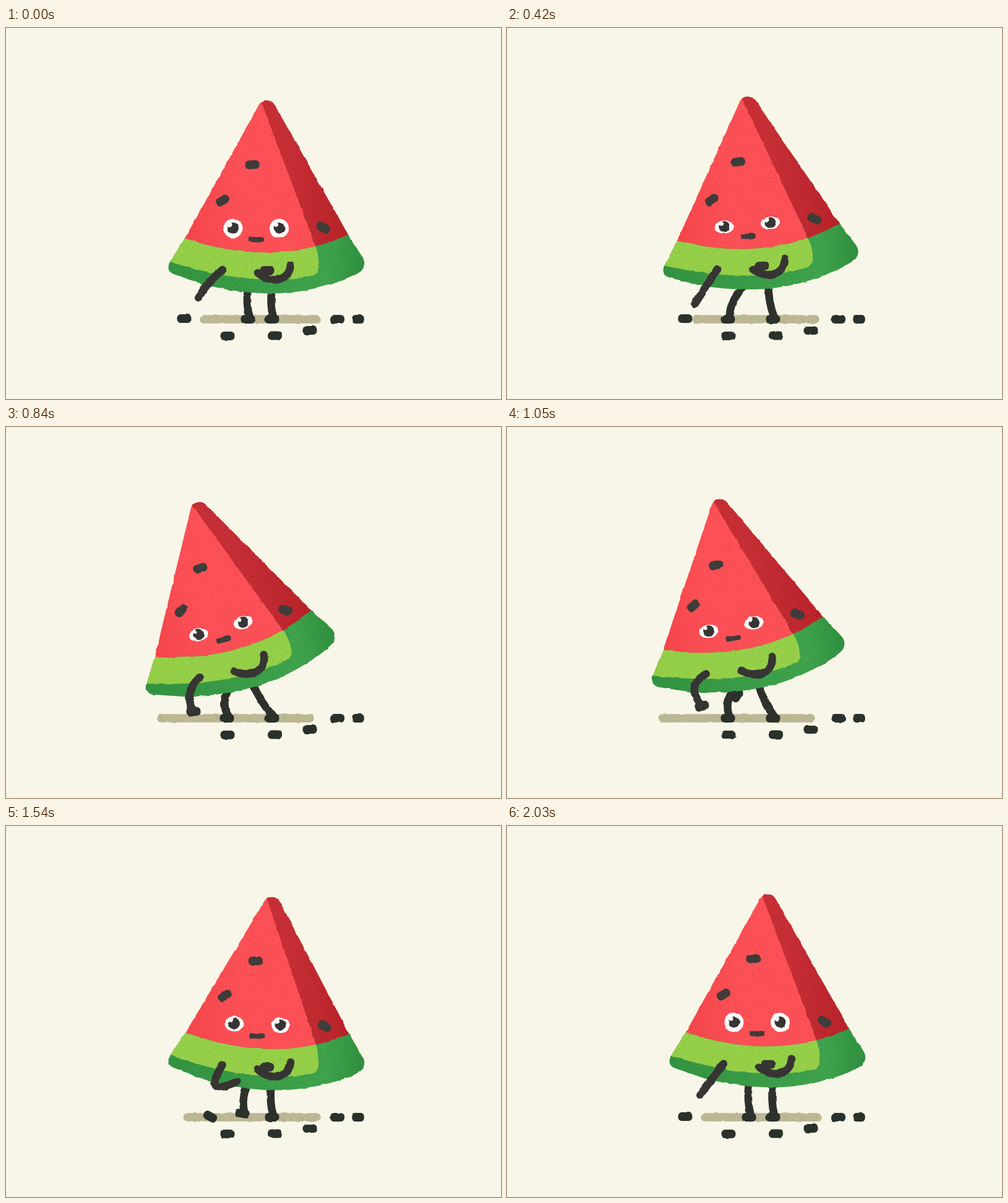
Recreate the animation shown at these times as an HTML page. Size 800 px wide and 600 px high, loop 2100 ms.

```html
<!DOCTYPE html>
<html lang="en">
<head>
<meta charset="utf-8">
<title>Melon slice</title>
<style>
  html, body { margin: 0; width: 100%; height: 100%; overflow: hidden; background: #f8f6e8; }
  svg { display: block; width: 800px; height: 600px; }
  .limb { fill: none; stroke: #383634; stroke-width: 12.5; stroke-linecap: round; }
  .leg { stroke: #2f312d; }
</style>
</head>
<body>
<svg viewBox="0 0 800 600">
  <defs>
    <filter id="rough" filterUnits="userSpaceOnUse" x="200" y="80" width="410" height="440" color-interpolation-filters="sRGB">
      <feTurbulence id="wobble" type="fractalNoise" baseFrequency=".09" result="n"/>
      <feDisplacementMap in="SourceGraphic" in2="n" scale="3.5" xChannelSelector="R" yChannelSelector="G" result="shape"/>
      <feTurbulence type="fractalNoise" baseFrequency=".6" numOctaves="2"/>
      <feColorMatrix values="0 0 0 0 0  0 0 0 0 0  0 0 0 0 0  .5 0 0 0 -.26"/>
      <feComposite in2="shape" operator="atop"/>
    </filter>
    <linearGradient id="flesh"><stop offset="0" stop-color="#f8464c"/><stop offset=".4" stop-color="#ff5157"/></linearGradient>
    <linearGradient id="side"><stop offset=".3" stop-color="#c92f36"/><stop offset="1" stop-color="#ba232a"/></linearGradient>
    <linearGradient id="rind"><stop offset="0" stop-color="#339542"/><stop offset=".8" stop-color="#40a54d"/><stop offset="1" stop-color="#2f9140"/></linearGradient>
    <rect id="seed" x="-11.5" y="-7" width="23" height="14" rx="6"/>
  </defs>
  <g filter="url(#rough)">
    <path id="shadow" stroke="#bfba96" stroke-width="13.5" stroke-linecap="round"/>
    <g fill="#2b322b">
      <use href="#seed" x="358" y="498"/>
      <use href="#seed" x="434.5" y="497.5"/>
      <use href="#seed" x="491" y="489"/>
      <use href="#seed" x="535.5" y="471"/>
      <use href="#seed" transform="translate(569 471) scale(.85 1)"/>
      <use href="#seed" id="foot"/>
      <use href="#seed" x="430" y="471"/>
    </g>
    <path id="legL" class="limb leg"/>
    <path id="legR" class="limb leg"/>
    <use href="#seed" id="loose" fill="#2b322b"/>
    <g id="body">
      <path fill="url(#rind)" d="M-132-43L132-49L156-11Q162 1 152 11Q130 26 79 38Q0 57-101 32L-150 15Q-162 10-157-3Z"/>
      <path fill="url(#side)" d="M-9-261Q-8-266 0-266Q9-266 13-259L132-49Q106-37 79-30Z"/>
      <path fill="#97d249" d="M-132-43Q-20-5 79-30Q86-14 84 5Q83 14 76 17Q-20 38-156-5Z"/>
      <path fill="url(#flesh)" d="M-132-43Q-20-5 79-30L-8-263Q-11-262-12-259Z"/>
      <g fill="#403d3b">
        <use href="#seed" transform="translate(-23 -162) rotate(-3)"/>
        <use href="#seed" transform="translate(-71 -104) rotate(-32)"/>
        <use href="#seed" transform="translate(92 -60) rotate(30)"/>
        <rect x="-29" y="-45" width="24" height="8.5" rx="3"/>
      </g>
      <g id="eyes"></g>
      <use href="#seed" id="held" x="1" y="9" fill="#383634"/>
      <path class="limb" d="M39 0C37 26 8 32-14 13"/>
    </g>
    <use href="#seed" id="carried" fill="#333431"/>
    <path id="arm" class="limb"/>
  </g>
</svg>
<script>
const LOOP = 2100, STEP = 70;
const PICK = 630, DROP = 840, PASS = 1400, REST = 2030;
const $ = id => document.getElementById(id);

const part = (t, a, b) => Math.min(1, Math.max(0, (t - a) / (b - a)));
const ease = (t, a, b) => { const u = part(t, a, b); return u * u * (3 - 2 * u); };
const pulse = (t, a, b, c, d) => ease(t, a, b) - ease(t, c, d);
const bump = (t, a, b) => Math.sin(Math.PI * part(t, a, b)) ** 2;
const arc = (t, a, b) => { const u = part(t, a, b); return 4 * u * (1 - u); };

// The left hand: rest, reach, lift, pass the seed on, hang, rest.
const hands = [[280, 311, 436], [PICK, 289, 467], [1050, 313, 448],
  [PASS, 385, 404], [1820, 341, 438], [REST, 312, 435]];
const handAt = t => hands.slice(1).reduce(([x, y], [end, nx, ny], i) => {
  const u = ease(t, hands[i][0], end);
  return [x + (nx - x) * u, y + (ny - y) * u];
}, hands[0].slice(1));

const place = (id, x, y, turn = 0) =>
  $(id).setAttribute('transform', `translate(${x} ${y}) rotate(${turn})`);
const curve = (id, from, bend, to) => $(id).setAttribute('d', `M${from}Q${bend} ${to}`);
const show = (id, on) => $(id).setAttribute('visibility', on ? 'visible' : 'hidden');

function leg(id, [hx, hy], x, y, bend) {
  curve(id, [hx, hy], [(hx + x) / 2 - bend, (hy + y) / 2 + 3], [x, y]);
}

// The shorter the reach, the further the elbow sticks out.
function arm([sx, sy], [hx, hy]) {
  const dx = hx - sx, dy = hy - sy, reach = Math.hypot(dx, dy);
  const bend = Math.max(0, 62 - reach) * 2.3 / reach;
  curve('arm', [sx, sy], [(sx + hx) / 2 - dy * bend, (sy + hy) / 2 + dx * bend], [hx, hy]);
}

// The dropped seed falls, bounces twice and rolls out.
function looseSeed(t) {
  if (t < PICK) return [288, 470];
  const u = part(t, DROP, REST), fall = part(t, DROP, 1120);
  const y = 470 - 82 * (1 - fall * fall) * (t < 1120) - 23 * arc(t, 1120, 1540) - 12 * arc(t, 1540, 1890);
  return [390 - 102 * u, y, -180 * (1 - (1 - u) ** 2)];
}

function draw(t) {
  const x = 421 + 1.5 * bump(t, 0, 420) - 31 * pulse(t, 280, 630, 1050, 1540) - 11 * bump(t, 630, 1050);
  const y = 383 - 4.5 * pulse(t, 280, 630, 1330, 1750) - 6 * bump(t, 210, 560) - 13 * bump(t, 1820, LOOP);
  const turn = 2.2 * pulse(t, 0, 210, 280, 490) - 15.4 * pulse(t, 280, 630, 840, 1400)
    + 2.9 * pulse(t, 1050, 1330, 1400, 1750);
  const r = turn * Math.PI / 180;
  const onBody = (px, py) => [
    x + px * Math.cos(r) - py * Math.sin(r),
    y + px * Math.sin(r) + py * Math.cos(r)];
  place('body', x, y, turn);

  const lid = 15.5 - 5 * pulse(t, 0, 420, 1400, 1750);
  $('eyes').innerHTML = [-54, 20.5].map(ex => `<g transform="translate(${ex} -59)">
    <ellipse rx="15.5" ry="${lid}" fill="#fff"/>
    <circle cy="-.5" r="9" fill="#383634"/><circle cx="-5" cy="-6" r="3.5" fill="#fff"/></g>`).join('');

  const left = 314 - 69 * pulse(t, 280, 770, 1050, 1900);
  const right = 508 - 11 * pulse(t, 280, 630, 1050, 1330);
  $('shadow').setAttribute('d', `M${left + 6} 471H${right - 6}`);

  const stride = 34 * pulse(t, 0, 420, 1260, 1680);
  const lift = 8 * (bump(t, 0, 420) + bump(t, 1260, 1680));
  place('foot', 391 - stride, 471 - lift, lift * 1.5);
  leg('legL', onBody(-30, 38), 394 - stride, 468 - lift, 5 + stride / 4);
  leg('legR', onBody(9, 38), 432, 468, 5);

  const hand = handAt(t);
  arm(onBody(-71, 8), hand);
  place('carried', hand[0] + 2, hand[1] + 3, -15 * part(t, PICK, 1050));
  place('loose', ...looseSeed(t));
  show('carried', t >= PICK && t < PASS);
  show('loose', t < PICK || t >= DROP);
  show('held', t < DROP || t >= PASS);
  $('wobble').setAttribute('seed', t / STEP % 4);
}

let last = -1;
const start = performance.now();
function tick() {
  const step = Math.floor(Math.max(0, performance.now() - start) % LOOP / STEP);
  if (step !== last) draw((last = step) * STEP);
  requestAnimationFrame(tick);
}
tick();
</script>
</body>
</html>
```
